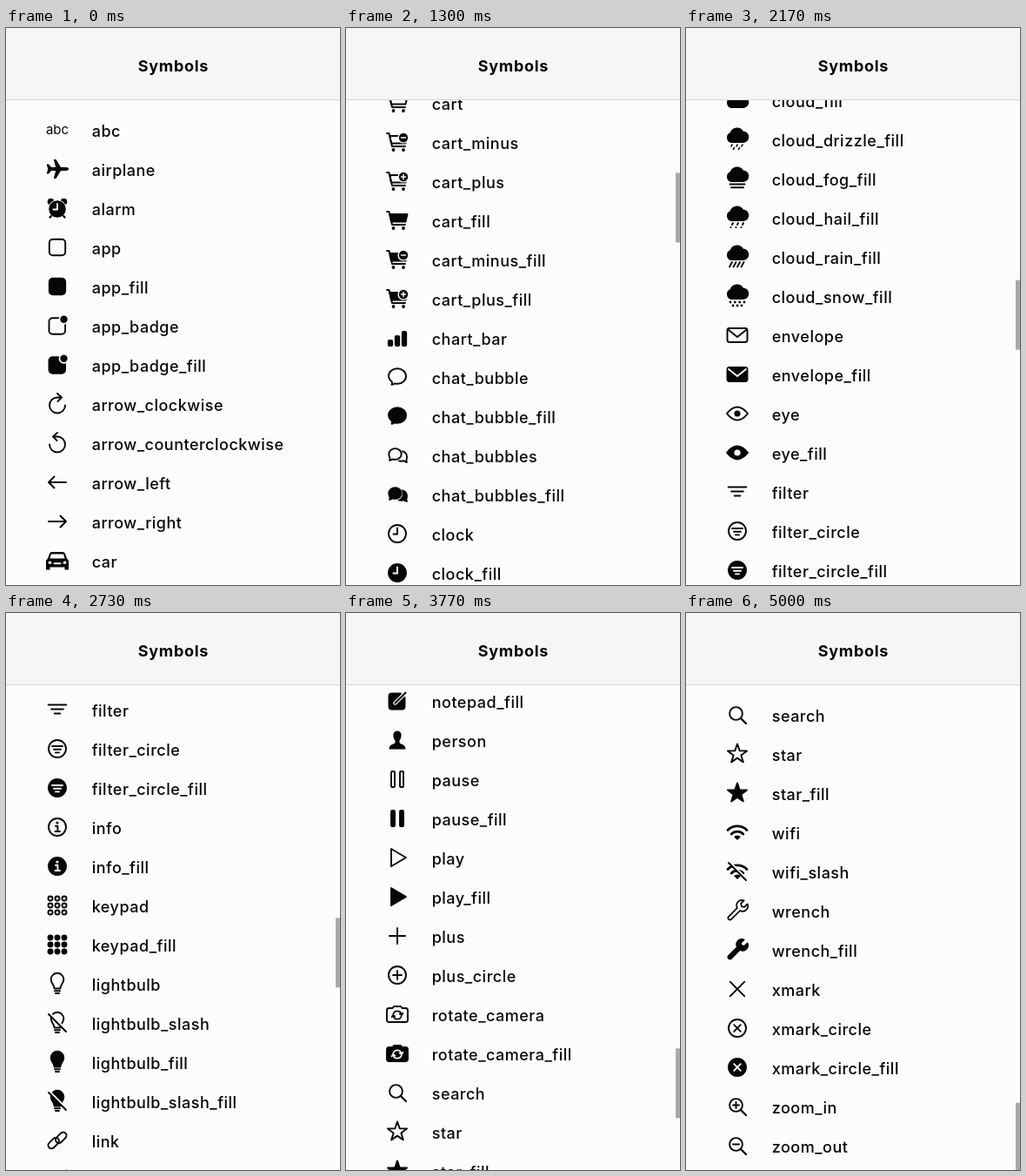
An HTML page for the animation above (5030 ms loop, 384 px wide and 640 px high).

```html
<!DOCTYPE html>
<html lang="en">
<head>
<meta charset="utf-8">
<title>Symbols</title>
<style>
  html, body { margin: 0; width: 100%; height: 100%; overflow: hidden; background: #fcfcfe; }
  #stage { position: absolute; left: 0; top: 0; width: 384px; height: 640px; overflow: hidden;
    background: #fcfcfe; color: #060606; font: 500 18px Inter, "Open Sans", sans-serif; }
  header { position: absolute; left: 0; top: 0; width: 384px; height: 83px; box-sizing: border-box;
    background: #f6f5f7; border-bottom: 1px solid #d5d3d8; text-align: center;
    font-weight: 700; letter-spacing: .7px; line-height: 88px; text-indent: 1px; }
  #list { position: absolute; left: 0; top: 96px; will-change: transform; }
  .row { position: relative; height: 45px; line-height: 45px; padding-left: 98.7px;
    letter-spacing: .5px; white-space: nowrap; }
  svg { position: absolute; left: 43.5px; top: 5.5px; width: 30px; height: 30px; overflow: visible;
    fill: none; stroke: #060606; stroke-width: 1.9; stroke-linecap: round; stroke-linejoin: round; }
  svg text { font-size: 15px; font-weight: 400; letter-spacing: 0; fill: #060606; stroke: none; }
  #bar { position: absolute; right: 0; top: 0; width: 5.5px; height: 80px; background: #aba7ab; }
</style>
</head>
<body>
<div id="stage">
  <div id="list"></div>
  <div id="bar"></div>
  <header>Symbols</header>
</div>
<script>
const INK = '#060606', PAPER = '#fcfcfe';
const names = `abc airplane alarm app app_fill app_badge app_badge_fill arrow_clockwise
  arrow_counterclockwise arrow_left arrow_right car cart cart_minus cart_plus cart_fill
  cart_minus_fill cart_plus_fill chart_bar chat_bubble chat_bubble_fill chat_bubbles
  chat_bubbles_fill clock clock_fill cloud cloud_drizzle cloud_fog cloud_hail cloud_rain
  cloud_snow cloud_fill cloud_drizzle_fill cloud_fog_fill cloud_hail_fill cloud_rain_fill
  cloud_snow_fill envelope envelope_fill eye eye_fill filter filter_circle filter_circle_fill
  info info_fill keypad keypad_fill lightbulb lightbulb_slash lightbulb_fill
  lightbulb_slash_fill link location location_slash location_fill location_slash_fill lock
  lock_open lock_fill lock_open_fill maximize minimize notepad notepad_fill person pause
  pause_fill play play_fill plus plus_circle rotate_camera rotate_camera_fill search star
  star_fill wifi wifi_slash wrench wrench_fill xmark xmark_circle xmark_circle_fill zoom_in
  zoom_out`.split(/\s+/);

// Drawing helpers: all icons are centred on 0,0
const path = (d, fill, extra = '') => `<path d="${d}" fill="${fill ? INK : 'none'}" ${extra}/>`;
const solid = d => path(d, true, 'stroke="none"');
const blank = d => `<path d="${d}" fill="${PAPER}" stroke="none"/>`;
const line = (d, light, width = 1.9) => path(d, false, `stroke="${light ? PAPER : INK}" stroke-width="${width}"`);
const disc = (x, y, r, color = INK) => `<circle cx="${x}" cy="${y}" r="${r}" fill="${color}" stroke="none"/>`;
const ring = (x, y, r, fill) => `<circle cx="${x}" cy="${y}" r="${r}" fill="${fill ? INK : 'none'}"/>`;
const box = (x, y, w, h, r, fill) =>
  `<rect x="${x}" y="${y}" width="${w}" height="${h}" rx="${r}" fill="${fill ? INK : 'none'}"/>`;
const group = (transform, body) => `<g transform="${transform}">${body}</g>`;
const slashed = body => body + line('M-9 -11L11.5 9.5', true, 2.6) + line('M-10 -10L10 10');
const each = (list, draw) => list.map(draw).join('');

const CLOCKWISE = path('M9 1.5A9 9 0 1 1 0 -7.5H4') + path('M0 -12L5 -7.5L0.5 -3');
const ARROW = path('M-10 0H10M3.5 -6.5L10 0L3.5 6.5');
const LENS = ring(-1.5, -1.5, 7.4) + line('M4 4L10 10', false, 2.3);

const cart = f => path('M-12 -10H-9.5L-6 5H9') + path('M-8.7 -7H11.5L9.5 1.5H-7Z', f) +
  disc(-4.5, 9, 1.9) + disc(7, 9, 1.9);
const cartBadge = (f, sign) => cart(f) + disc(7, -5, 6.6, PAPER) + disc(7, -5, 5.2) + line(sign, true, 1.5);
const cloud = f => path('M-7 7.5A5.2 5.2 0 0 1 -7.5 -2.5A7.4 7.4 0 0 1 6.3 -4A5.7 5.7 0 0 1 7 7.5Z', f);
const weather = (f, drops) => group('translate(0 -4.5)', cloud(f)) + drops;
const bubble = (x, y, r, f) =>
  path(`M${x - r} ${y}a${r} ${r * .88} 0 1 1 ${r} ${r * .88}q-1.5 0 -3 -.5q-1.5 1.5 -3.5 1.5q1 -1.5 .5 -3Q${x - r} ${y + 3} ${x - r} ${y}Z`, f);
const inCircle = (f, mark) => ring(0, 0, 10, f) + line(mark, f);
const bulb = f => path('M-3.4 5.5C-3.4 1 -7.3 0 -7.3 -5A7.3 7.3 0 0 1 7.3 -5C7.3 0 3.4 1 3.4 5.5Z', f) +
  path('M-3 8.3H3M-2 11H2');
const pointer = f => path('M10.5 -10.5L1.5 10.5L-.5 .5L-10.5 -1.5Z', f);
const star = f => path('M' + Array.from({ length: 10 }, (_, i) => {
  const a = i * Math.PI / 5, r = i % 2 ? 4.6 : 11.6;
  return `${(r * Math.sin(a)).toFixed(2)} ${(-r * Math.cos(a)).toFixed(2)}`;
}).join('L') + 'Z', f);
const wifi = () => line('M-11 -2.5A15.5 15.5 0 0 1 11 -2.5M-6.8 2A9.5 9.5 0 0 1 6.8 2', false, 2.8) +
  solid('M0 9L-4 5Q0 1.8 4 5Z');
const bars = f => box(-7, -9, 4, 18, 1, f) + box(3, -9, 4, 18, 1, f);

const icons = {
  abc: () => '<text y="4.5" text-anchor="middle">abc</text>',
  airplane: () => solid('M13 0Q13 -1.8 10 -1.9H4L-1.5 -11H-4.2L-1.8 -1.9H-7L-10 -5.5H-12.3L-10.8 0L-12.3 5.5H-10L-7 1.9H-1.8L-4.2 11H-1.5L4 1.9H10Q13 1.8 13 0Z'),
  alarm: () => disc(-7.5, -7.5, 3.8) + disc(7.5, -7.5, 3.8) + path('M-6 8L-8.5 10.5M6 8L8.5 10.5') +
    disc(0, 1, 10.6, PAPER) + disc(0, 1, 9.8) + line('M0 -5V1.5H-4.5', true) + path('M-7 9L-8.5 10.5M7 9L8.5 10.5'),
  app: f => box(-9.2, -9.2, 18.4, 18.4, 4, f),
  app_badge: f => box(-9.5, -8.8, 18.6, 18.6, 4, f) + disc(7.5, -7.2, 5.9, PAPER) + disc(7.5, -7.2, 4.2),
  arrow_clockwise: () => CLOCKWISE,
  arrow_counterclockwise: () => group('scale(-1 1)', CLOCKWISE),
  arrow_left: () => group('scale(-1 1)', ARROW),
  arrow_right: () => ARROW,
  car: () => solid('M-13 10.5V0L-11 -2.5L-9 -8Q-8.3 -10 -6 -10H6Q8.3 -10 9 -8L11 -2.5L13 0V10.5H8.5V7.5H-8.5V10.5Z') +
    blank('M-8.6 -2.5L-7 -7.6H7L8.6 -2.5Z') + disc(-8.5, 2.3, 1.8, PAPER) + disc(8.5, 2.3, 1.8, PAPER) +
    line('M-3.5 3.2H3.5', true, 2),
  cart,
  cart_minus: f => cartBadge(f, 'M4.5 -5h5'),
  cart_plus: f => cartBadge(f, 'M4.5 -5h5M7 -7.5v5'),
  chart_bar: () => each([-8, 0, 8], (x, i) => box(x - 2.2, 3 - i * 5, 4.4, 6 + i * 5, 1, true)),
  chat_bubble: f => bubble(0, -1, 10, f),
  chat_bubbles: f => group('translate(4.5 1) scale(-1 1)', bubble(0, 0, 6.5, f)) +
    disc(-2.5, -1.5, 8.6, PAPER) + bubble(-2.5, -1.5, 7.2, f),
  clock: f => inCircle(f, 'M0 -6.5V.5H-4.5'),
  cloud: f => group('translate(0 .5)', cloud(f)),
  cloud_drizzle: f => weather(f, path('M-6 6l-1 2M0 6l-1 2M6 6l-1 2M-3.5 9.5l-1 2M2.5 9.5l-1 2', false, 'stroke-width="1.6"')),
  cloud_fog: f => weather(f, path('M-8.5 6.5H8.5M-7 10.2H7')),
  cloud_hail: f => weather(f, path('M-5 6l-1 2M1 6l-1 2M7 6l-1 2') + disc(-7.5, 11, 1.1) + disc(-1.5, 11, 1.1) + disc(4.5, 11, 1.1)),
  cloud_rain: f => weather(f, path('M-6 6l-3 5.5M-1.5 6l-3 5.5M3 6l-3 5.5M7.5 6l-3 5.5')),
  cloud_snow: f => weather(f, each([-8, -2.7, 2.7, 8], x => disc(x, 7, 1.4)) + each([-5, 0, 5], x => disc(x, 11, 1.4))),
  envelope: f => box(-11.5, -8, 23, 16, 2.5, f) + line('M-10 -6L0 2L10 -6', f),
  eye: f => path('M-12 0Q0 -15 12 0Q0 15 -12 0Z', f) + disc(0, 0, 3.6, f ? PAPER : INK),
  filter: () => path('M-10.3 -5.5H10.3M-6.8 -.5H6.8M-3.3 4.5H3.3'),
  filter_circle: f => inCircle(f, 'M-6 -3H6M-4 .7H4M-2 4.4H2'),
  info: f => inCircle(f, 'M-2 -1.3H.4V5M-2.5 5H3') + disc(0, -5, 1.6, f ? PAPER : INK),
  keypad: f => each([-8, 0, 8], y => each([-8, 0, 8], x => ring(x, y, 2.5, f))),
  lightbulb: bulb,
  lightbulb_slash: f => slashed(bulb(f)),
  link: () => group('rotate(-45)', box(-12.5, -4.6, 14.5, 7.6, 3.8) + box(-2, -3, 14.5, 7.6, 3.8)),
  location: pointer,
  location_slash: f => slashed(pointer(f)),
  lock: f => box(-6.7, -.8, 13.4, 10.6, 2, f) + path('M-4.5 -1V-6A4.5 4.5 0 0 1 4.5 -6V-1'),
  lock_open: f => box(-10.5, -.8, 13.4, 10.6, 2, f) + path('M2 -1V-6A4.5 4.5 0 0 1 11 -6V-2'),
  maximize: () => path('M-2.5 -2.5L-10 -10M-10 -4V-10H-4M2.5 2.5L10 10M10 4V10H4'),
  minimize: () => path('M-10 -10L-2.5 -2.5M-2.5 -8.5V-2.5H-8.5M10 10L2.5 2.5M2.5 8.5V2.5H8.5'),
  notepad: f => path('M4 -8.5H-6.5Q-9.5 -8.5 -9.5 -5.5V6.5Q-9.5 9.5 -6.5 9.5H5.5Q8.5 9.5 8.5 6.5V-4', f) +
    line('M-2.5 2.5L9.5 -9.5', true, 4.5) + line('M-2.5 2.5L9.5 -9.5', false, 2),
  person: () => solid('M0 -10.5C6 -10.5 5.4 -3 2.5 .5V3C4 5 9.5 4.5 9.5 10.5H-9.5C-9.5 4.5 -4 5 -2.5 3V.5C-5.4 -3 -6 -10.5 0 -10.5Z'),
  pause: bars,
  play: f => path('M-7 -10L10 0L-7 10Z', f),
  plus: () => path('M-9 0H9M0 -9V9'),
  plus_circle: f => inCircle(f, 'M-5 0H5M0 -5V5'),
  rotate_camera: f => path('M-9.5 -7H-5.5L-4 -9H4L5.5 -7H9.5Q12 -7 12 -4.5V6.5Q12 9 9.5 9H-9.5Q-12 9 -12 6.5V-4.5Q-12 -7 -9.5 -7Z', f) +
    line('M-4.8 0A5 5 0 0 1 4.8 0M4.8 2A5 5 0 0 1 -4.8 2M2.5 -.5L5 1L6.5 -1.5M-2.5 2.5L-5 1L-6.5 3.5', f, 1.6),
  search: () => LENS,
  star,
  wifi,
  wifi_slash: () => slashed(wifi()),
  wrench: f => group('rotate(45) scale(1.08)',
    path('M-2 11V-2A5.6 5.6 0 0 1 -2.6 -12.6V-8L0 -6.3L2.6 -8V-12.6A5.6 5.6 0 0 1 2 -2V11A2 2 0 0 1 -2 11Z', f, 'stroke-width="1.6"')),
  xmark: () => path('M-8.3 -8.3L8.3 8.3M8.3 -8.3L-8.3 8.3'),
  xmark_circle: f => inCircle(f, 'M-3.8 -3.8L3.8 3.8M3.8 -3.8L-3.8 3.8'),
  zoom_in: () => LENS + path('M-5 -1.5H2M-1.5 -5V2'),
  zoom_out: () => LENS + path('M-5 -1.5H2'),
};

const list = document.getElementById('list'), bar = document.getElementById('bar');
list.innerHTML = each(names, name => {
  const icon = icons[name.replace(/_fill$/, '')](name.endsWith('_fill'));
  return `<div class="row"><svg viewBox="-15 -15 30 30">${icon}</svg>${name}</div>`;
});

// Scroll positions as [tick, pixels], joined by a monotone cubic curve
const LOOP = 5030, TICK = 100 / 3;
const keys = [[0, 0], [18, 0], [29, 180], [49, 1003], [82, 1851], [100, 2417], [127, 3266], [138, 3330], [151, 3330]];
const rate = i => (keys[i + 1][1] - keys[i][1]) / (keys[i + 1][0] - keys[i][0]);
const slopes = keys.map((_, i) => {
  if (!i || i === keys.length - 1) return 0;
  const a = rate(i - 1), b = rate(i);
  return a * b > 0 ? 2 * a * b / (a + b) : 0;
});

function scrollAt(tick) {
  const i = Math.max(0, keys.findIndex(k => k[0] > tick) - 1);
  const [t0, y0] = keys[i], [t1, y1] = keys[i + 1];
  const span = t1 - t0, u = (tick - t0) / span, v = 1 - u;
  return y0 * v * v * (1 + 2 * u) + y1 * u * u * (3 - 2 * u) +
    span * u * v * (slopes[i] * v - slopes[i + 1] * u);
}

const start = performance.now();
function draw() {
  const time = (performance.now() - start) % LOOP;
  const tick = Math.min(150, Math.floor((time + 5) / TICK));
  const y = scrollAt(tick);
  list.style.transform = `translateY(${-y}px)`;
  bar.style.transform = `translateY(${84.5 + y * .1436}px)`;
  bar.style.opacity = Math.min(1, Math.max(0, (tick - 18) / 6));
  requestAnimationFrame(draw);
}
draw();
</script>
</body>
</html>
```
